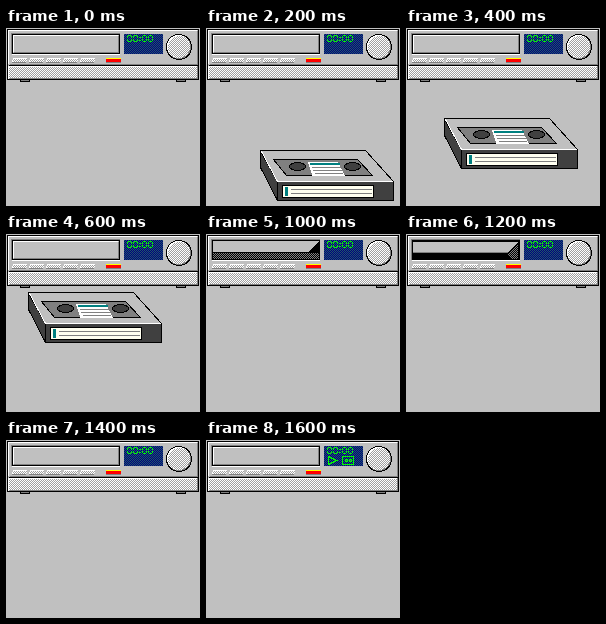
Write an HTML page that moves like this. It is 194 px wide and 178 px high and loops after 2.6 s.

```html
<!DOCTYPE html>
<html lang="en">
<head>
<meta charset="utf-8">
<title>Video recorder</title>
<style>
html, body { margin: 0; width: 100%; height: 100%; overflow: hidden; background: #c0c0c0; }
svg { display: block; width: 194px; height: 178px; shape-rendering: crispEdges; }
.line { fill: none; stroke: #000; }
.white { stroke: #fff; }
.grey { stroke: #808080; }
.edge { stroke: #000; }
.tape, .wide, .half, .icons { animation: 2.6s step-end infinite; }
.tape { animation-name: slide; }
.wide { animation-name: wide; }
.half { animation-name: half; }
.icons { animation-name: icons; }
/* one step every 200 ms */
@keyframes slide {
  0% { transform: translate(54px, 122px); visibility: hidden; }
  7.69% { transform: translate(54px, 122px); visibility: visible; }
  15.38% { transform: translate(38px, 90px); visibility: visible; }
  23.07% { transform: translate(22px, 58px); visibility: visible; }
  30.76% { transform: translate(6px, 26px); visibility: visible; }
  38.46%, 100% { transform: translate(6px, 26px); visibility: hidden; }
}
@keyframes wide {
  0% { visibility: hidden; }
  30.76% { visibility: visible; }
  46.15%, 100% { visibility: hidden; }
}
@keyframes half {
  0% { visibility: hidden; }
  46.15% { visibility: visible; }
  53.84%, 100% { visibility: hidden; }
}
@keyframes icons {
  0% { visibility: hidden; }
  61.53%, 100% { visibility: visible; }
}
</style>
</head>
<body>
<svg viewBox="0 0 194 178" role="img" aria-label="A tape slides into a video recorder showing 00:00">
  <defs>
    <pattern id="light" width="2" height="2" patternUnits="userSpaceOnUse">
      <path fill="#a0a0a0" d="M0 0h2v2h-2z"/><path fill="#fff" d="M0 0h1v1h-1zM1 1h1v1h-1z"/>
    </pattern>
    <pattern id="mid" width="2" height="2" patternUnits="userSpaceOnUse">
      <path fill="#808080" d="M0 0h2v2h-2z"/><path fill="#fff" d="M0 0h1v1h-1zM1 1h1v1h-1z"/>
    </pattern>
    <pattern id="dark" width="2" height="2" patternUnits="userSpaceOnUse">
      <path d="M0 0h2v2h-2z"/><path fill="#808080" d="M0 0h1v1h-1zM1 1h1v1h-1z"/>
    </pattern>
    <pattern id="blue" width="2" height="2" patternUnits="userSpaceOnUse">
      <path fill="#000080" d="M0 0h2v2h-2z"/><path fill="#205868" d="M0 0h1v1h-1zM1 1h1v1h-1z"/>
    </pattern>
    <g id="key">
      <path fill="url(#light)" d="M1 0h14v3h-1v2h-14v-3h1z"/>
      <path fill="#fff" d="M1 0h14v1h-13v1h-1v2h-1v-2h1z"/>
      <path fill="#808080" d="M0 4h14v1h-14z"/>
    </g>
    <!-- zero made of LCD segments -->
    <path id="zero" d="M1 0h3v1h-3zM0 1h1v2h-1zM4 1h1v2h-1zM0 4h1v2h-1zM4 4h1v2h-1zM1 6h3v1h-3z"/>
  </defs>

  <path fill="#c0c0c0" d="M0 0h194v178h-194z"/>

  <!-- cabinet -->
  <path d="M14 52h10v2h-10zM170 52h10v2h-10z"/>
  <path fill="#808080" d="M15 52h8v1h-8zM171 52h8v1h-8z"/>
  <path fill="url(#light)" d="M2 38h190v13h-190z"/>
  <g transform="translate(.5 .5)">
    <path class="line white" d="M2 35V2H190M2 50V38H190"/>
    <path class="line grey" d="M191 2V50H3M3 36H190"/>
    <path class="line" d="M1 1H192V51H1ZM2 37H191"/>
  </g>

  <!-- slot -->
  <path fill="#808080" d="M5 5h109v1h-108v20h-1z"/>
  <path fill="#fff" d="M114 6v21h-108v-1h107v-20z"/>
  <path d="M6 6h108v20h-108z"/>
  <path fill="#c0c0c0" d="M7 7h106v18h-106z"/>
  <path fill="#fff" d="M7 24V7h105v1h-104v16z"/>
  <path fill="#808080" d="M112 8h1v17h-105v-1h104z"/>
  <g class="wide">
    <path fill="url(#dark)" d="M7 7h106v18h-106z"/>
    <path fill="#c0c0c0" d="M7 7h106l-12 12h-94z"/>
    <path d="M7 18h95l11-11v12h-106z"/>
  </g>
  <g class="half">
    <path d="M7 7h106v18h-106z"/>
    <path fill="#c0c0c0" d="M7 8h105l-11 11h-94z"/>
    <path fill="#808080" d="M7 18h95v1h-95z"/>
    <path fill="url(#dark)" d="M112 9v16h-6l-5-5z"/>
  </g>

  <!-- keys -->
  <use href="#key" x="6" y="30"/><use href="#key" x="23" y="30"/><use href="#key" x="40" y="30"/>
  <use href="#key" x="57" y="30"/><use href="#key" x="74" y="30"/>
  <path fill="#808080" d="M100 34h15v1h-15z"/>
  <path fill="#ff0" d="M100 30h15v1h-15z"/>
  <path fill="#f00" d="M100 31h15v3h-15z"/>

  <!-- display -->
  <path fill="url(#blue)" d="M118 6h39v20h-39z"/>
  <g fill="#0f0">
    <use href="#zero" x="121" y="7"/><use href="#zero" x="127" y="7"/>
    <path d="M133 9h2v1h-2zM133 12h2v1h-2z"/>
    <use href="#zero" x="136" y="7"/><use href="#zero" x="142" y="7"/>
  </g>
  <g class="icons" fill="none" stroke="#0f0" transform="translate(.5 .5)">
    <path d="M122 16V24L130 20Z"/>
    <path d="M136 16H147V24H136ZM139 19h2v2h-2zM143 19h2v2h-2z"/>
  </g>

  <!-- knob -->
  <circle cx="173" cy="19" r="13"/>
  <circle cx="173" cy="19" r="12" fill="#808080"/>
  <circle cx="172.5" cy="18.5" r="11.5" fill="#fff"/>
  <circle cx="173" cy="19" r="11" fill="url(#light)"/>

  <!-- cassette, 134 by 51 -->
  <g class="tape">
    <g transform="translate(.5 .5)">
      <path class="edge" fill="url(#dark)" d="M0 1L17 31V50L0 17Z"/>
      <path class="edge" fill="url(#mid)" d="M0 0H105L133 31H17Z"/>
      <path class="edge" fill="url(#dark)" d="M17 31H133V50H17Z"/>
      <path class="line white" d="M1 1L17 31H132"/>
      <path class="edge" fill="#808080" d="M13 9H97L112 25H26Z"/>
      <g stroke="#000" fill="url(#dark)">
        <ellipse cx="37" cy="16" rx="8" ry="4"/>
        <ellipse cx="92" cy="16" rx="8" ry="4"/>
      </g>
      <path fill="#fff" d="M47 11H77L84 25H52Z"/>
      <path stroke="#008080" stroke-width="2" d="M49 13.5H79"/>
      <path class="grey" d="M51 17H80M52 20H81M54 23H82"/>
      <path class="edge" fill="#fffff0" d="M22 35H113V47H22Z"/>
      <path class="grey" d="M30 39H111M30 43H111"/>
    </g>
    <path fill="#008080" d="M25 37h3v9h-3z"/>
  </g>
</svg>
</body>
</html>
```
